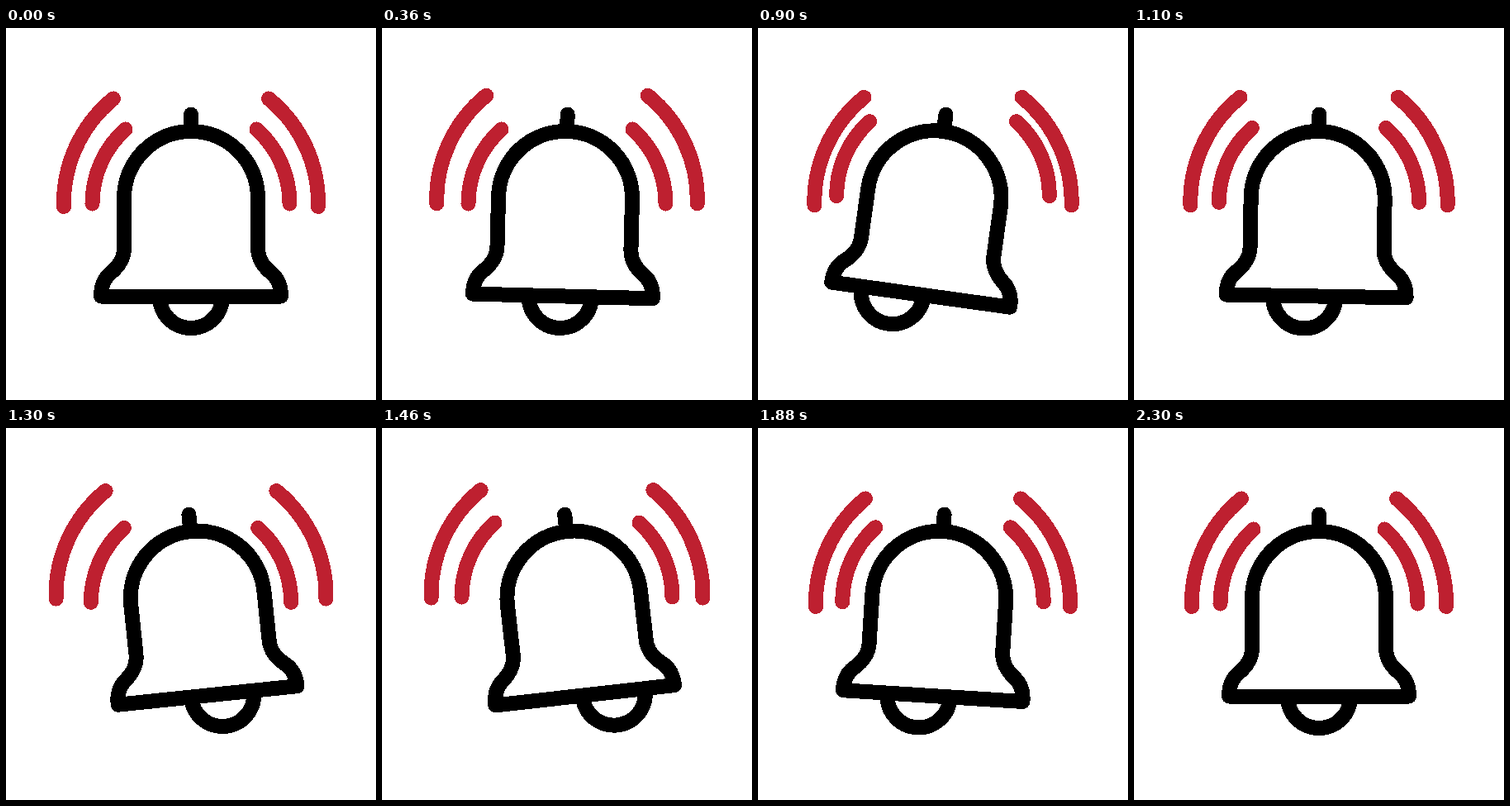
Animation, 448 px wide and 450 px high, one loop 2.32 s. Source, as an HTML page:

```html
<!DOCTYPE html>
<html lang="en">
<head>
<meta charset="utf-8">
<title>Ringing bell</title>
<style>
  html, body { margin: 0; width: 100%; height: 100%; overflow: hidden; background: #fff; }
  svg { display: block; width: 448px; height: 450px; }
  path { fill: none; stroke-width: 18; stroke-linecap: round; stroke-linejoin: round; shape-rendering: crispEdges; }
  .waves { stroke: #be2030; }
  .bell { stroke: #000; }
  #clapper { stroke-linecap: butt; }
</style>
</head>
<body>
<svg viewBox="0 0 448 450">
  <defs>
    <g id="side" class="waves">
      <path id="outer" d="M130 85.5A163 163 0 0 0 70 216"/>
      <path id="inner" d="M144.5 122.5A121 121 0 0 0 104.5 212.5"/>
    </g>
  </defs>
  <use href="#side"/>
  <use href="#side" transform="matrix(-1 0 0 1 448 0)"/>
  <g id="bell" class="bell">
    <path id="clapper" d="M186 325a38 38 0 0 0 76 0"/>
    <path d="M224 104.5V125"/>
    <path d="M115 324.5C115 312 119 303 126 297C137 288 143 279 143 266V206
             a81 81 0 0 1 162 0V266C305 279 311 288 322 297C329 303 333 312 333 324.5Z"/>
  </g>
</svg>
<script>
const LOOP = 2320, STEP = 20;
const el = id => document.getElementById(id);
const [bell, clapper, outer, inner] = ["bell", "clapper", "outer", "inner"].map(el);

// Keys are [time, value]; each stretch between them eases in and out.
const swing = [[200, 0], [800, 9], [1400, -7], [1800, 4], [2200, 0]];
const slide = [[240, 0], [860, -35], [1530, 37], [1950, -21], [2300, 0]];

function at(keys, t) {
  if (t <= keys[0][0]) return keys[0][1];
  for (let i = 1; i < keys.length; i++) {
    const [t0, a] = keys[i - 1], [t1, b] = keys[i];
    if (t < t1) return a + (b - a) * (1 - Math.cos(Math.PI * (t - t0) / (t1 - t0))) / 2;
  }
  return keys[keys.length - 1][1];
}

// Two pulses of 800 ms along the diagonal.
function pulse(wave, t) {
  const p = t > 0 && t < 1600 ? t / 800 : 0;
  const d = -5.5 * (1 - Math.cos(2 * Math.PI * p));
  wave.setAttribute("transform", `translate(${d} ${d})`);
}

function draw(now) {
  const t = Math.floor(now % LOOP / STEP) * STEP;
  const x = at(slide, t);
  bell.setAttribute("transform", `rotate(${at(swing, t)} 224 130)`);
  clapper.setAttribute("transform", `translate(${x} ${Math.abs(x) * 0.05})`);
  pulse(outer, t - 200);
  pulse(inner, t - 400);
}

let start;
function tick(now) {
  start ??= now;
  draw(now - start);
  requestAnimationFrame(tick);
}
draw(0);
requestAnimationFrame(tick);
</script>
</body>
</html>
```
